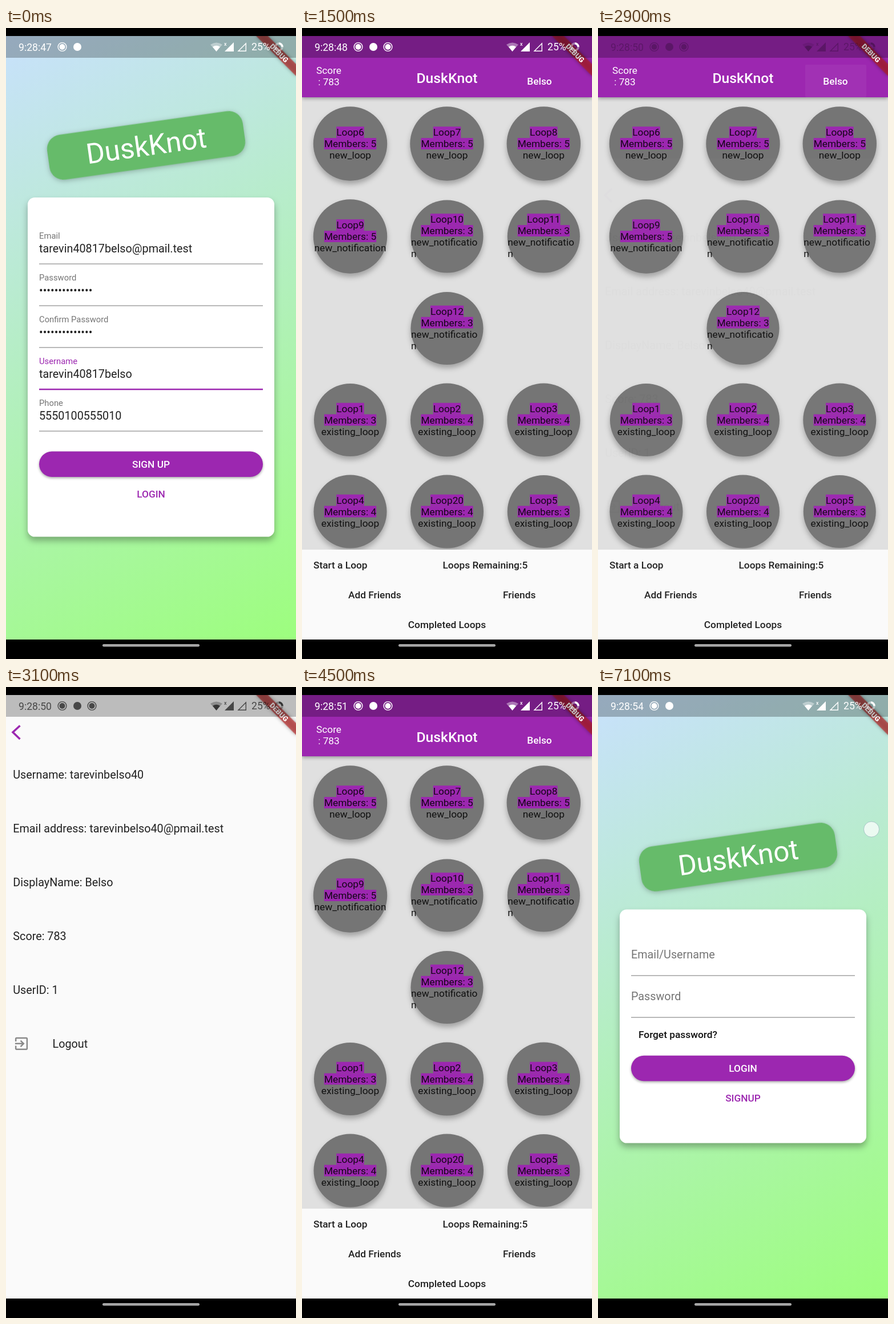
Recreate the animation shown at these times as an HTML page. Size 508x1102 px, loop 7.2 s.

```html
<!DOCTYPE html>
<html lang="en">
<head>
<meta charset="utf-8">
<title>App walkthrough</title>
<style>
  html, body { margin: 0; width: 100%; height: 100%; overflow: hidden; background: #000; }
  svg { display: block; width: 100vw; height: 100vh; font-family: Roboto, sans-serif; }
  .badge { filter: drop-shadow(0 2px 5px rgba(0,0,0,.26)); }
  .card { filter: drop-shadow(0 7px 6px rgba(0,0,0,.3)); }
  .pill { filter: drop-shadow(0 2px 2px rgba(0,0,0,.35)); }
  .disc { filter: drop-shadow(0 6px 5px rgba(0,0,0,.28)); }
  .bar { filter: drop-shadow(0 2px 3px rgba(0,0,0,.35)); }
  .ribbon { filter: drop-shadow(0 0 3px rgba(0,0,0,.5)); }
</style>
</head>
<body>
<svg id="stage" viewBox="0 0 508 1102">
  <defs>
    <linearGradient id="sky" gradientUnits="userSpaceOnUse" x1="0" y1="14" x2="508" y2="1068">
      <stop stop-color="#c8e1fc"/><stop offset="1" stop-color="#9dfe7e"/>
    </linearGradient>
    <clipPath id="screen"><rect y="14" width="508" height="1054"/></clipPath>
  </defs>
  <rect width="508" height="1102"/>
  <g clip-path="url(#screen)">
    <g id="feed"></g>
    <g id="profile"></g>
    <g id="signup"></g>
    <g id="login"></g>
    <g transform="translate(508 14) rotate(45)">
      <rect class="ribbon" x="-49.4" y="34.6" width="98.8" height="14.8" fill="#b71c1c" fill-opacity=".65"/>
      <text y="46.5" font-size="12.6" font-weight="900" text-anchor="middle" fill="#fff">DEBUG</text>
    </g>
    <rect y="14" width="508" height="38" fill-opacity=".25"/>
    <g id="status">
      <text id="clock" x="22" y="39.5" font-size="17.6"></text>
      <g id="rec"><circle cx="98.5" cy="33" r="7.4" fill="none" stroke="currentColor" stroke-width="1.4"/><circle cx="98.5" cy="33" r="5"/></g>
      <circle cx="125" cy="33" r="7"/>
      <use id="rec2" href="#rec" x="52"/>
      <path d="M358 29Q368.500 22 379 29L368.500 41Z" opacity=".4"/>
      <path d="M362 33Q368.500 28.500 375 33L368.500 41Z"/>
      <path d="M399 25V41H383Z"/>
      <path d="M420.300 27V40.300H407Z" fill="none" stroke="currentColor" stroke-width="1.4"/>
      <text x="382" y="31" font-size="9" font-weight="500">x</text>
      <text x="430" y="39" font-size="17.6">25%</text>
      <circle cx="478" cy="33" r="6" fill="none" stroke="currentColor" stroke-width="3.500" opacity=".4"/>
      <path d="M478 27A6 6 0 0 1 484 33" fill="none" stroke="currentColor" stroke-width="3.500"/>
    </g>
    <circle id="dot" r="13.5" fill="#fff" fill-opacity=".72" stroke="#7d9cab" stroke-opacity=".5"/>
  </g>
  <rect x="169" y="1076" width="170" height="4.500" rx="2.2" fill="#a6a6a6"/>
</svg>
<script>
const $ = id => document.getElementById(id);
const APP = 'DuskKnot', NAME = 'Belso', USER = 'tarevinbelso40';
const PURPLE = '#9c27b0', INK = '#212121', GREY = '#757575';
const SMALL = 14.8, BODY = 17.29, FIELD = 19.77;

function add(parent, tag, attrs) {
  const el = document.createElementNS('http://www.w3.org/2000/svg', tag);
  for (const key in attrs) el.setAttribute(key, attrs[key]);
  return parent.appendChild(el);
}
const rect = (p, x, y, width, height, fill, more) => add(p, 'rect', { x, y, width, height, fill, ...more });
function text(p, x, y, size, str, fill = INK, more = {}) {
  const el = add(p, 'text', { x, y, 'font-size': size, fill, ...more });
  el.textContent = str;
  return el;
}
const MID = { 'text-anchor': 'middle' }, BOLD = { 'font-weight': 500 }, MIDBOLD = { ...MID, ...BOLD };

function authPage(p, badgeY, cardY, cardH) {
  rect(p, 0, 14, 508, 1054, 'url(#sky)');
  const g = add(p, 'g', { transform: `translate(245.5 ${badgeY}) rotate(-8)` });
  rect(g, -173, -39.5, 346, 79, '#66bb6a', { rx: 24.7, class: 'badge' });
  text(g, 0, 18, 49.4, APP, '#fff', MID);
  rect(p, 38, cardY, 432, cardH, '#fff', { rx: 12.3, class: 'card' });
}
const underline = (p, y, focused) =>
  rect(p, 58, focused ? y - 1.2 : y - .6, 392, focused ? 2.5 : 1.2, focused ? PURPLE : '#8c8c8c');
function buttons(p, y, main, other) {
  rect(p, 58, y, 392, 44.5, PURPLE, { rx: 22.2, class: 'pill' });
  text(p, 254, y + 28.4, BODY, main, '#fff', MIDBOLD);
  text(p, 254, y + 80.2, BODY, other, PURPLE, MIDBOLD);
}

// Sign-up page
const signup = $('signup');
authPage(signup, 205, 296, 592.5);
const dots = '•'.repeat(14);
[['Email', 'tarevin40817belso@pmail.test'], ['Password', dots], ['Confirm Password', dots],
 ['Username', 'tarevin40817belso'], ['Phone', '5550100555010']].forEach(([label, value], i) => {
  const y = i * 73, focused = label === 'Username';
  text(signup, 58, 368 + y, SMALL, label, focused ? PURPLE : GREY);
  text(signup, 58, 392 + y, FIELD, value);
  underline(signup, 412 + y, focused);
});
buttons(signup, 739.5, 'SIGN UP', 'LOGIN');
const ripple = rect(signup, 58, 739.5, 392, 44.5, '#fff', { rx: 22.2 });

// Login page
const login = $('login');
authPage(login, 297, 388.5, 408);
['Email/Username', 'Password'].forEach((label, i) => {
  text(login, 58, 474 + i * 73, FIELD, label, GREY);
  underline(login, 504 + i * 73);
});
text(login, 71, 612.5, BODY, 'Forget password?', '#111', BOLD);
buttons(login, 643.7, 'LOGIN', 'SIGNUP');

// Home feed
const feed = $('feed');
rect(feed, 0, 14, 508, 1054, '#e0e0e0');
function tile(cx, cy, r, loop, members, state) {
  add(feed, 'circle', { cx, cy, r, fill: GREY, class: 'disc' });
  const wrap = state === 'new_notification' && r < 64;
  const lines = [loop, 'Members: ' + members, ...(wrap ? ['new_notificatio', 'n'] : [state])];
  lines.forEach((line, i) => {
    const y = cy + (i - (lines.length - 1) / 2) * 19.9;
    const left = wrap && i > 1;
    const mark = i < 2 && rect(feed, 0, y - 9.9, 0, 19.9, PURPLE);
    const el = text(feed, left ? cx - 63 : cx, y + 6.2, BODY, line, 'rgba(0,0,0,.87)', left ? {} : MID);
    if (mark) {
      const w = el.getComputedTextLength();
      mark.setAttribute('x', cx - w / 2);
      mark.setAttribute('width', w);
    }
  });
}
const COLS = [84.5, 254, 423.3];
[[202, 'new_loop', [0, 64.7, 6, 5], [1, 64.7, 7, 5], [2, 64.7, 8, 5]],
 [364, 'new_notification', [0, 64.7, 9, 5], [1, 63.5, 10, 3], [2, 63.5, 11, 3]],
 [524.5, 'new_notification', [1, 63.5, 12, 3]],
 [684.5, 'existing_loop', [0, 63.5, 1, 3], [1, 64, 2, 4], [2, 64, 3, 4]],
 [844.5, 'existing_loop', [0, 64, 4, 4], [1, 64, 20, 4], [2, 63.5, 5, 3]]
].forEach(([y, state, ...tiles]) =>
  tiles.forEach(([col, r, n, members]) => tile(COLS[col], y, r, 'Loop' + n, members, state)));
rect(feed, 0, 14, 508, 107, PURPLE, { class: 'bar' });
const press = rect(feed, 363, 64, 107, 57, '#fff', { rx: 2 });
text(feed, 47, 80, BODY, 'Score', '#fff', MID);
text(feed, 47, 100, BODY, ': 783', '#fff', MID);
text(feed, 254, 96, 24.7, APP, '#fff', MIDBOLD);
text(feed, 416, 99, BODY, NAME, '#fff', MIDBOLD);
rect(feed, 0, 911, 508, 157, '#fafafa');
text(feed, 20, 944, BODY, 'Start a Loop', INK, BOLD);
text(feed, 246.5, 944, BODY, 'Loops Remaining:5', INK, BOLD);
text(feed, 81, 996, BODY, 'Add Friends', INK, BOLD);
text(feed, 352, 996, BODY, 'Friends', INK, BOLD);
text(feed, 254, 1048, BODY, 'Completed Loops', INK, MIDBOLD);

// Profile page
const profile = $('profile');
rect(profile, 0, 14, 508, 1054, '#fafafa');
add(profile, 'path', { d: 'M24.500 67.500L12 79L24.500 91', fill: 'none', stroke: PURPLE, 'stroke-width': 3.5 });
['Username: ' + USER, `Email address: ${USER}@pmail.test`, 'DisplayName: ' + NAME, 'Score: 783', 'UserID: 1', 'Logout']
  .forEach((line, i) => text(profile, i === 5 ? 81.500 : 12.3, 160 + i * 93.9, FIELD, line));
add(profile, 'path', {
  transform: 'translate(12.2 608) scale(1.235)', fill: '#8a8a8a',
  d: 'M10.090 15.590L11.500 17l5-5-5-5-1.410 1.410L12.670 11H3v2h9.670zM19 3H5c-1.100 0-2 .9-2 2v4h2V5h14v14H5v-4H3v4c0 1.100.9 2 2 2h14c1.100 0 2-.9 2-2V5c0-1.100-.9-2-2-2z'
});

const LOOP = 7200;
// start, end, x, y of each touch
const TOUCHES = [[100, 300, 254, 762], [2500, 2800, 416, 94], [4100, 4300, 191.5, 626],
                 [5900, 6400, 479, 248.5], [6900, 7200, 479, 248.5]];
const progress = (t, a, b) => Math.min(1, Math.max(0, (t - a) / (b - a)));
const show = (el, on) => { el.style.display = on ? '' : 'none'; };

// New pages rise by a quarter of the screen while fading in.
function rise(page, k) {
  page.setAttribute('opacity', k * k);
  page.setAttribute('transform', `translate(0 ${263 * (1 - k) ** 2})`);
}
function pulse(t, a, b, peak) {
  return peak * Math.sin(Math.PI * progress(t, a, b));
}

function draw(t) {
  show(signup, t < 1500);
  show(feed, t >= 1500 && t < 5100);
  show(profile, t >= 2880 && t < 4500);
  show(login, t >= 4600);
  rise(profile, progress(t, 2880, 3090));
  rise(login, progress(t, 4700, 5050));
  ripple.setAttribute('opacity', pulse(t, 80, 1150, .2));
  press.setAttribute('opacity', pulse(t, 2500, 3050, .06));

  $('clock').textContent = '9:28:' + (47 + Math.floor((t + 300) / 1000));
  const color = t < 2800 || t >= 4500 ? '#fff' : `rgba(0,0,0,${t < 3000 ? .22 : .62})`;
  $('status').style.color = $('status').style.fill = color;
  show($('rec2'), t >= 1500 && t < 5000);

  const touch = TOUCHES.find(([a, b]) => t >= a && t < b);
  show($('dot'), touch);
  if (touch) {
    $('dot').setAttribute('cx', touch[2]);
    $('dot').setAttribute('cy', touch[3]);
    $('dot').setAttribute('opacity', .6 + .4 * progress(t, touch[0], touch[0] + 100));
  }
}

const start = performance.now();
function tick() {
  draw((performance.now() - start) % LOOP);
  requestAnimationFrame(tick);
}
tick();
</script>
</body>
</html>
```
